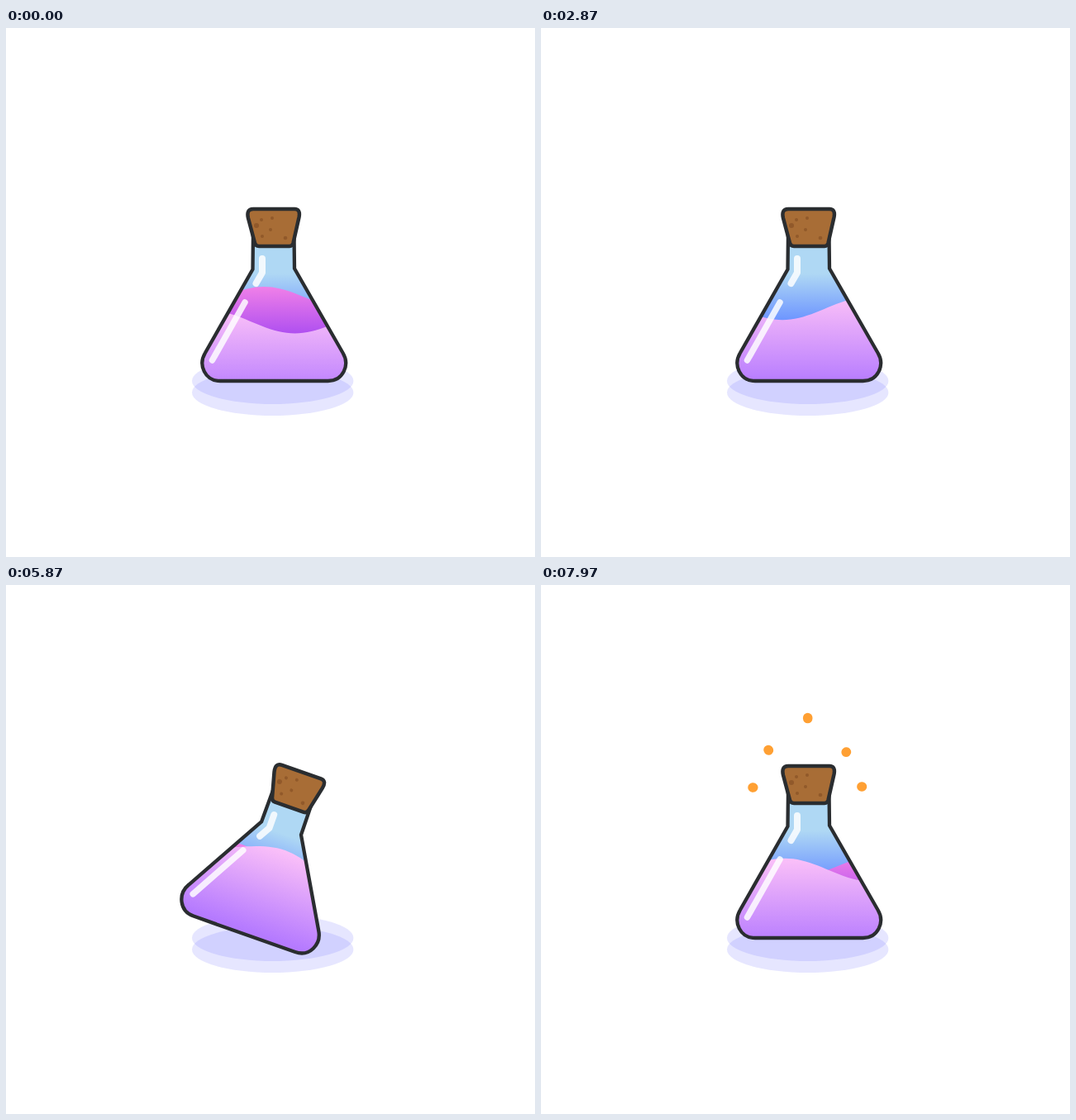
Write an HTML page that moves like this. It is 640 px wide and 640 px high and loops after 8000 ms.

```html
<!DOCTYPE html>
<html lang="en">
<head>
<meta charset="utf-8">
<title>Potion flask</title>
<style>
  html, body { margin: 0; width: 100%; height: 100%; overflow: hidden; background: #fff; }
  svg { display: block; width: 100%; height: 100%; }
  .line { fill: none; stroke-linecap: round; stroke-linejoin: round; }
</style>
</head>
<body>
<svg viewBox="0 0 640 640">
  <defs>
    <linearGradient id="glass" gradientUnits="userSpaceOnUse" x1="0" y1="297" x2="0" y2="352">
      <stop stop-color="#afd8f4"/><stop offset="1" stop-color="#6f97ff"/>
    </linearGradient>
    <linearGradient id="backFill" gradientUnits="userSpaceOnUse" x1="0" y1="-14" x2="0" y2="42">
      <stop stop-color="#f080e8"/><stop offset="1" stop-color="#b050f0"/>
    </linearGradient>
    <linearGradient id="frontFill" gradientUnits="userSpaceOnUse" x1="0" y1="-14" x2="0" y2="92">
      <stop stop-color="#fbc0f8"/><stop offset="1" stop-color="#b57aff"/>
    </linearGradient>
    <path id="body" d="M299 250L298.5 292L241 393C232 408 241 427 259 427H389.5C407.5 427 416.5 408 407.5 393L349 291L348.5 250"/>
    <clipPath id="inside"><use href="#body"/></clipPath>
  </defs>

  <g fill="#6466ff" fill-opacity=".16">
    <ellipse cx="322.7" cy="427" rx="97.7" ry="28"/>
    <ellipse cx="322.7" cy="441" rx="97.7" ry="28"/>
  </g>

  <g id="sparks" class="line" stroke="#ffa033" stroke-width="11.5"></g>

  <g id="flask">
    <use href="#body" fill="url(#glass)"/>
    <g clip-path="url(#inside)">
      <path id="back" fill="url(#backFill)"/>
      <path id="front" fill="url(#frontFill)"/>
    </g>
    <use href="#body" class="line" stroke="#2a2d30" stroke-width="4.3"/>
    <g class="line" stroke="#fff" stroke-opacity=".83">
      <path d="M310 279V296L302.5 309" stroke-width="8"/>
      <path d="M289 332L249.5 402" stroke-width="7.5"/>
    </g>
    <path d="M299 219H349Q356.500 219 354.500 229L347.500 260Q346.500 264 343 264H306Q302 264 301 260L293 230Q290.500 219 299 219Z"
      fill="#a86d36" stroke="#2a2d30" stroke-width="4.5"/>
    <g fill="#91592a">
      <circle cx="303" cy="239" r="3"/><circle cx="309" cy="232" r="2"/>
      <circle cx="322" cy="230" r="2"/><circle cx="320" cy="244" r="2"/>
      <circle cx="310" cy="252" r="2"/><circle cx="338" cy="254" r="2.3"/>
    </g>
  </g>
</svg>
<script>
  const LOOP = 8000, WAVELENGTH = 210, AMPLITUDE = 14;
  const byId = id => document.getElementById(id);
  const clamp = p => Math.min(1, Math.max(0, p));
  const smooth = p => p * p * (3 - 2 * p);
  const mix = (a, b, p) => a + (b - a) * p;

  // Eased interpolation through [time, value] pairs.
  function track(keys, t) {
    if (t <= keys[0][0]) return keys[0][1];
    for (let i = 1; i < keys.length; i++) {
      const [t0, v0] = keys[i - 1], [t1, v1] = keys[i];
      if (t < t1) return mix(v0, v1, smooth((t - t0) / (t1 - t0)));
    }
    return keys[keys.length - 1][1];
  }

  const tilt = [[5185, 0], [5740, 26], [6290, -19.7], [6840, 5.3], [7390, 0]];
  const backLevel = [[0, 327], [1130, 332], [2870, 343], [5230, 339.5], [7970, 341]];

  // Cosine surface with a crest at x = 0 and its mean level at y = 0.
  function wavePath() {
    const points = [];
    for (let x = -630; x <= 630; x += 5) {
      points.push(x + ' ' + (-AMPLITUDE * Math.cos(2 * Math.PI * x / WAVELENGTH)).toFixed(2));
    }
    return 'M' + points.join('L') + 'V130H-630Z';
  }
  const front = byId('front'), back = byId('back'), flask = byId('flask');
  [front, back].forEach(wave => wave.setAttribute('d', wavePath()));

  // Inner start and outer end of each spark: x0, y0, x1, y1.
  const sparks = [
    [322.7, 210, 322.7, 160.5],
    [295.5, 221.8, 275, 199.5],
    [352.3, 217.4, 369.5, 202],
    [291.2, 245, 256, 245],
    [359.8, 244, 388.5, 244]
  ].map(ray => {
    const path = document.createElementNS('http://www.w3.org/2000/svg', 'path');
    byId('sparks').append(path);
    return { ray, path };
  });

  function place(node, x, y) {
    node.setAttribute('transform', `translate(${x} ${y})`);
  }

  function draw(t) {
    place(front, 454.5 - 0.02 * t, 341.5 + 14 * Math.cos(2 * Math.PI * (t - 100) / 10000));
    place(back, 312 - 0.0405 * t, track(backLevel, t));
    flask.setAttribute('transform', `rotate(${track(tilt, t)} 320 320)`);

    const head = 1 - (1 - clamp((t - 6700) / 850)) ** 1.5;
    const tail = clamp((t - 6700) / 1300);
    for (const { ray: [x0, y0, x1, y1], path } of sparks) {
      const at = p => `${mix(x0, x1, p)} ${mix(y0, y1, p)}`;
      path.setAttribute('d', `M${at(tail)}L${at(head)}`);
    }
    byId('sparks').style.display = t > 6700 ? '' : 'none';
  }

  const start = performance.now();
  function tick() {
    draw((performance.now() - start) % LOOP);
    requestAnimationFrame(tick);
  }
  draw(0);
  requestAnimationFrame(tick);
</script>
</body>
</html>
```
